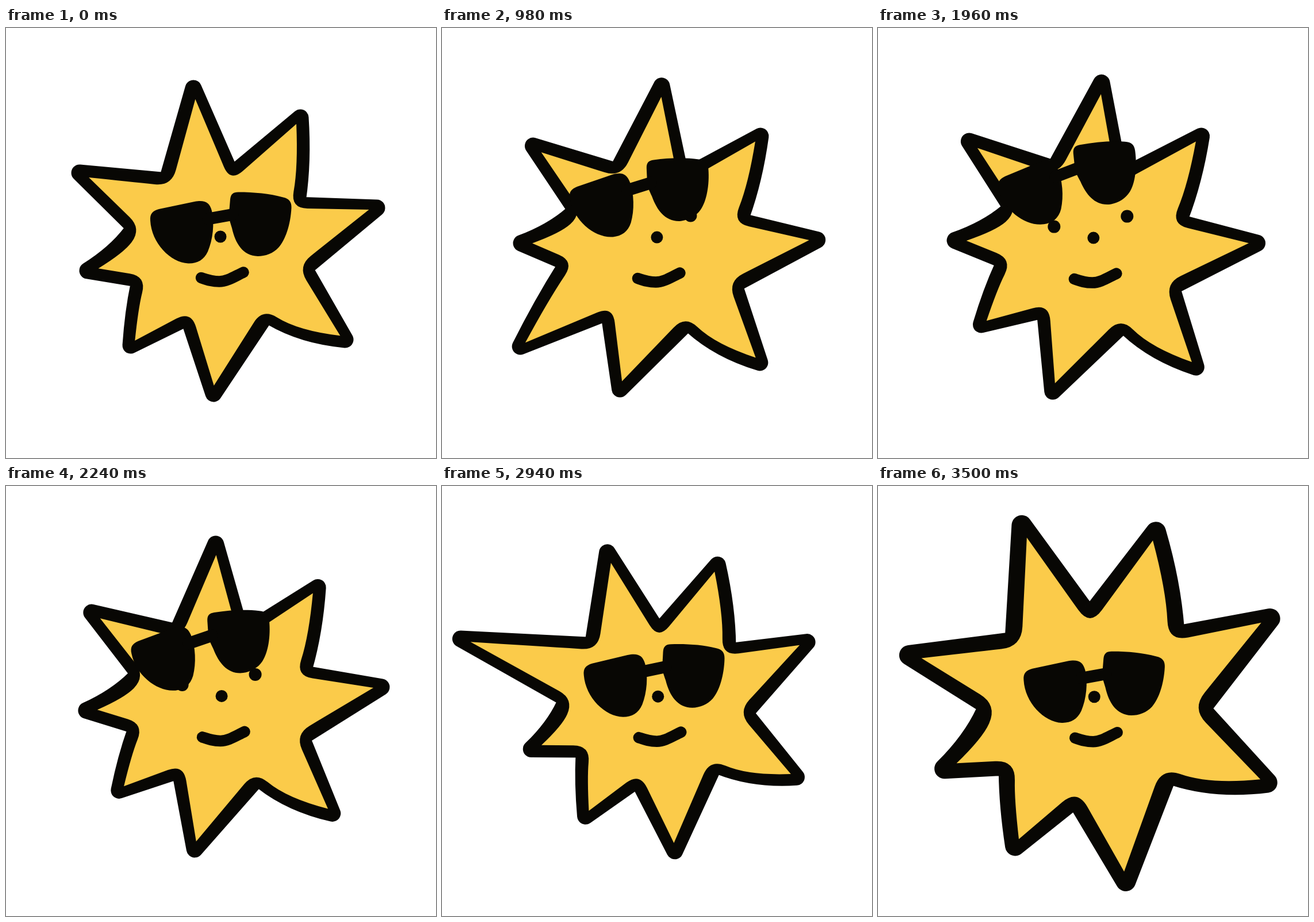
Animation of 748 by 748 pixels, one loop 3570 ms. Source, as an HTML page with a canvas:

```html
<!DOCTYPE html>
<html lang="en">
<head>
<meta charset="utf-8">
<title>Cool sun</title>
<style>
  html, body { margin: 0; width: 100%; height: 100%; overflow: hidden; background: #fff; }
  canvas { display: block; width: 100%; height: 100%; }
</style>
</head>
<body>
<canvas id="stage" width="748" height="748"></canvas>
<script>
const ctx = document.getElementById('stage').getContext('2d');
const SIZE = 748, MID = SIZE / 2, STEP = 140, LOOP = 3570;
const INK = '#080704', GOLD = '#fbcb4a';
const { PI, sin, cos, hypot, abs } = Math;

// Clockwise rays: tip x, tip y, gold inset, bulge of the trailing edge, next valley x, y
const RAYS = [
  [326, 105, 19, 0, 392, 256],
  [512, 156, 13, 4, 506, 308],
  [645, 313, 14, 0, 519, 418],
  [590, 542, 11, 8, 453, 498],
  [361, 636, 14, 0, 317, 503],
  [217, 552, 11, 2, 233, 437],
  [142, 422, 19, -5, 224, 347],
  [128, 252, 18, 0, 280, 266]
];

// Moments when one ray shoots out: ray, step, amount
const SHOTS = [[1, 3, .24], [5, 7, .26], [3, 11, .27], [7, 21, .315]];

const LEFT_LENS = new Path2D('M251 335C250 323 255 318 266 315L328 302C346 299 354 303 358 318C363 340 360 368 351 389C344 404 332 410 317 409.5C286 408 253 374 251 335Z');
const RIGHT_LENS = new Path2D('M390 298C391 289 395 285.5 404 285.5C432 285.5 458 288 482 294.5C493 297 497 303 496.5 313C495 342 486 369 474 382C465 392 451 397 438 397C412 396 399 375 393 348C390 338 387 330 388 322Z');
const BRIDGE = new Path2D('M352 332L394 324.5');
const MOUTH = new Path2D('M339.5 434.5C350 438 358 441 371 441C385 441 398 432 413 425');
const WINK = new Path2D('M423 336.5C426 340 429 342 434 342C439 342 442 340 444 337.5');

function reach(ray, t) {
  let sum = 0;
  for (const [r, peak, amount] of SHOTS) {
    const d = abs(t - peak);
    if (r === ray && d < 2) sum += amount * cos(d * PI / 4) ** 2;
  }
  return sum;
}

const turn = t => t < 12 ? 14.6 * sin(t * PI / 24) : .8 + 13.8 * cos((t - 12) * PI / 12);

function swell(t) {
  if (t > 21) return 1 + .23 * cos((t - 24) * .4);
  if (t >= 8 && t < 16) return 1 + .052 * cos((t - 8) * PI / 16);
  return 1;
}

// Point relative to the centre, scaled by k and then pulled inwards
function pull(x, y, k, inset) {
  x -= MID;
  y -= MID;
  const f = k - inset / hypot(x, y);
  return [x * f, y * f];
}

function toward(a, b, dist) {
  const f = dist / hypot(b[0] - a[0], b[1] - a[1]);
  return [a[0] + (b[0] - a[0]) * f, a[1] + (b[1] - a[1]) * f];
}

function starPath(t, inner) {
  const n = RAYS.length;
  const ext = RAYS.map((_, i) => reach(i, t));
  const tips = RAYS.map(([x, y, inset], i) => pull(x, y, 1 + ext[i], inner ? inset : 0));
  const round = inner ? 29 : 11;
  ctx.beginPath();
  RAYS.forEach(([, , , bulge, vx, vy], i) => {
    const j = (i + 1) % n, a = tips[i], b = tips[j];
    const v = pull(vx, vy, 1 + .15 * (ext[i] + ext[j]), inner ? 12 : 0);
    const dx = v[0] - a[0], dy = v[1] - a[1], k = 2 * bulge / hypot(dx, dy);
    const c = [(a[0] + v[0]) / 2 + dy * k, (a[1] + v[1]) / 2 - dx * k];
    if (!i) ctx.moveTo(...a);
    ctx.quadraticCurveTo(...c, ...toward(v, c, round));
    ctx.quadraticCurveTo(...v, ...toward(v, b, round));
    ctx.lineTo(...b);
  });
  ctx.closePath();
}

function drawStar(t) {
  ctx.save();
  ctx.translate(MID + t * .14, MID);
  ctx.rotate(turn(t) * PI / 180);
  ctx.scale(swell(t), swell(t));
  starPath(t, false);
  ctx.lineWidth = 29;
  ctx.fill();
  ctx.stroke();
  starPath(t, true);
  ctx.fillStyle = GOLD;
  ctx.fill();
  ctx.restore();
}

function dot(x, y, r) {
  ctx.beginPath();
  ctx.arc(x, y, r, 0, 2 * PI);
  ctx.fill();
}

function line(path, width) {
  ctx.lineWidth = width;
  ctx.stroke(path);
}

function drawFace(t) {
  ctx.save();
  ctx.translate(t * .13, t * .15);
  dot(373, 363, 10.5);
  dot(304.5, 343.5, 11);
  if (t >= 10 && t < 14) line(WINK, 20);
  else dot(431.5, 325.5, 11);
  line(MOUTH, 19.5);

  const lift = sin(t * PI / 24) ** 2;
  ctx.translate(374 - 45.5 * lift, 348 - 85.5 * lift);
  ctx.rotate(-11.5 * lift * PI / 180);
  ctx.translate(-374, -348);
  ctx.fill(LEFT_LENS);
  ctx.fill(RIGHT_LENS);
  line(BRIDGE, 21);
  ctx.restore();
}

function frame(now) {
  const t = Math.floor(now % LOOP / STEP);
  ctx.fillStyle = '#fff';
  ctx.fillRect(0, 0, SIZE, SIZE);
  ctx.fillStyle = ctx.strokeStyle = INK;
  ctx.lineJoin = ctx.lineCap = 'round';
  drawStar(t);
  drawFace(t);
  requestAnimationFrame(frame);
}

frame(performance.now());
</script>
</body>
</html>
```
